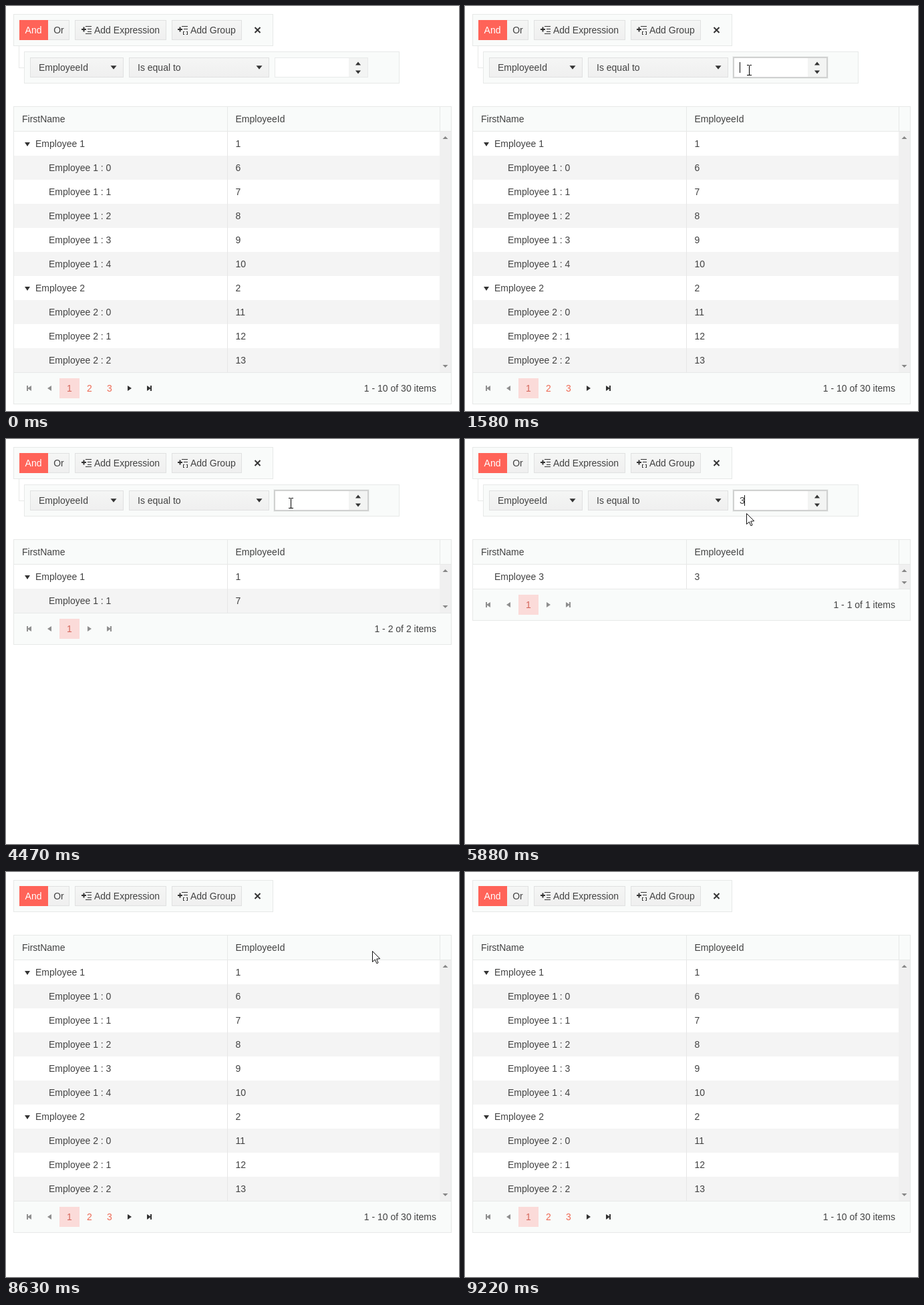
An HTML page with a canvas that plays this animation: 678x606 px, repeating every 9970 ms.

```html
<!DOCTYPE html>
<html lang="en">
<head>
<meta charset="utf-8">
<title>Filter and tree list</title>
<style>
  html, body { margin: 0; width: 100%; height: 100%; overflow: hidden; background: #fff; }
  canvas { display: block; }
</style>
</head>
<body>
<canvas id="stage" width="678" height="606"></canvas>
<script>
const ctx = document.getElementById('stage').getContext('2d');
const LOOP = 9970;
const FONT = '14px "Liberation Sans", Arial, sans-serif';
const INK = '#424242', DARK = '#333', RED = '#ff6358', LINE = '#e7e9e8', PANEL = '#f9fbfa';
const ROW = 36;

const allRows = [];
let nextId = 6;
[[1, 5], [2, 3]].forEach(([n, kids]) => {
  allRows.push({ name: 'Employee ' + n, id: n, open: true });
  for (let i = 0; i < kids; i++) allRows.push({ name: `Employee ${n} : ${i}`, id: nextId++, child: true });
});
const sevenRows = [allRows[0], allRows[2]];
const threeRows = [{ name: 'Employee 3', id: 3 }];

// Pointer trips: time, x, y; the pointer advances once per step.
const trips = [
  { from: 630, to: 5130, step: 64, path: [[630, 426, 518], [758, 425, 345], [886, 424, 206], [950, 424, 181],
    [1078, 425, 128], [1206, 425, 99], [1270, 425, 96], [3600, 425, 96], [3620, 426, 96]] },
  { from: 5130, to: 7030, step: 70, path: [[5130, 425, 99], [5200, 424, 104], [5340, 421, 111]] },
  { from: 7030, to: 8420, step: 65, path: [[7030, 432, 118], [7160, 474, 136], [7225, 503, 140], [7290, 530, 137],
    [7420, 559, 122], [7550, 564, 100], [7680, 564, 91]] },
  { from: 8420, to: 9220, step: 70, path: [[8420, 563, 94], [8490, 560, 100], [8630, 548, 118], [8770, 532, 182],
    [8980, 522, 380], [9190, 516, 557]] }
];
const caretSpans = [[1580, 2130], [2550, 3100], [3610, 4160], [4670, 5190], [5700, 6430], [6960, 7490]];

function along(path, t) {
  if (t <= path[0][0]) return { x: path[0][1], y: path[0][2] };
  for (let i = 1; i < path.length; i++) {
    const [t0, x0, y0] = path[i - 1], [t1, x1, y1] = path[i];
    if (t < t1) {
      const k = (t - t0) / (t1 - t0);
      return { x: Math.round(x0 + (x1 - x0) * k), y: Math.round(y0 + (y1 - y0) * k) };
    }
  }
  const end = path[path.length - 1];
  return { x: end[1], y: end[2] };
}

function pointerAt(t, lag = 0) {
  const trip = trips.find(m => t >= m.from && t < m.to);
  if (!trip) return null;
  const n = Math.floor((t - trip.from) / trip.step) - lag;
  return along(trip.path, trip.from + n * trip.step);
}

function fill(x, y, w, h, color) {
  ctx.fillStyle = color;
  ctx.fillRect(x, y, w, h);
}

function box(x, y, w, h, bg, border) {
  fill(x, y, w, h, bg);
  ctx.strokeStyle = border;
  ctx.lineWidth = 1;
  ctx.strokeRect(x + .5, y + .5, w - 1, h - 1);
}

function text(s, x, y, color = INK, align = 'left') {
  ctx.font = FONT;
  ctx.textAlign = align;
  ctx.fillStyle = color;
  ctx.fillText(s, x, y);
}

function shape(points, color) {
  ctx.beginPath();
  points.forEach(([x, y]) => ctx.lineTo(x, y));
  ctx.closePath();
  ctx.fillStyle = color;
  ctx.fill();
}

// Vertical triangle; a negative height points up.
function tri(cx, cy, half, h, color) {
  shape([[cx - half, cy - h / 2], [cx + half, cy - h / 2], [cx, cy + h / 2]], color);
}

// Sideways triangle; dir is -1 for left, 1 for right.
function side(cx, cy, dir, color, bar) {
  shape([[cx - 3 * dir, cy - 4], [cx - 3 * dir, cy + 4], [cx + 3 * dir, cy]], color);
  if (bar) fill(dir < 0 ? cx - 4 : cx + 2, cy - 4, 2, 8, color);
}

function button(x, y, w) {
  const g = ctx.createLinearGradient(0, y, 0, y + 30);
  g.addColorStop(0, '#f5f6f5');
  g.addColorStop(1, '#efefef');
  box(x, y, w, 30, g, '#e0e1e1');
}

function cross(cx, cy) {
  ctx.strokeStyle = DARK;
  ctx.lineWidth = 2;
  ctx.beginPath();
  for (const d of [-4, 4]) {
    ctx.moveTo(cx - 4, cy - d);
    ctx.lineTo(cx + 4, cy + d);
  }
  ctx.stroke();
}

function addIcon(x, group) {
  fill(x, 34, 7, 2, DARK);
  fill(x + 2.5, 31.5, 2, 7, DARK);
  fill(x + 6, 30, 9, 1, DARK);
  fill(x + 9, 34, 6, 1, DARK);
  if (group) {
    for (const [bx, tick] of [[x + 8, 0], [x + 14, -1]]) {
      fill(bx, 38, 1, 5, DARK);
      fill(bx + tick, 38, 2, 1, DARK);
      fill(bx + tick, 42, 2, 1, DARK);
    }
  } else {
    fill(x + 9, 38, 6, 1, DARK);
    fill(x + 6, 41, 9, 1, DARK);
  }
}

function toolbar() {
  box(11, 12, 389, 48, PANEL, LINE);
  button(62, 21, 33);
  fill(20, 21, 43, 30, RED);
  text('And', 41, 41, '#fff', 'center');
  text('Or', 79, 41, INK, 'center');
  button(103, 21, 137);
  addIcon(113, false);
  text('Add Expression', 132, 41);
  button(248, 21, 105);
  addIcon(257, true);
  text('Add Group', 276, 41);
  cross(376.5, 36);
}

function expression(value, focused, hovered, caret) {
  fill(19, 60, 1, 33, LINE);
  fill(19, 92, 8, 1, LINE);
  box(27, 68, 562, 48, PANEL, LINE);
  button(36, 77, 140);
  text('EmployeeId', 49, 97);
  tri(161, 92, 4.5, 5.5, DARK);
  button(184, 77, 210);
  text('Is equal to', 197, 97);
  tri(379, 92, 4.5, 5.5, DARK);

  if (focused) {
    fill(400, 75, 144, 34, 'rgba(0,0,0,.035)');
    fill(401, 76, 142, 32, 'rgba(0,0,0,.14)');
  }
  box(402, 77, 140, 30, '#fff', focused ? '#d2d2d2' : hovered ? '#dcdddd' : '#e8eaea');
  fill(513, 78, 28, 28, '#f3f4f3');
  tri(527, 86, 4, -5, DARK);
  tri(527, 99, 4, 5, DARK);
  text(value, 411, 97);
  if (caret) fill(value ? 418 : 411, 84, 1, 16, '#111');
}

function pager(top, full) {
  const c = top + 24, off = '#8f8f8f', on = full ? DARK : off;
  side(35, c, -1, off, true);
  side(65, c, -1, off);
  fill(80, c - 15, 30, 30, '#fbdbd9');
  text('1', 95, c + 5, '#d4675c', 'center');
  if (full) {
    text('2', 125, c + 5, '#ee6a55', 'center');
    text('3', 155, c + 5, '#ee6a55', 'center');
  }
  const x = full ? 185 : 125;
  side(x, c, 1, on);
  side(x + 29, c, 1, on, true);
  text(full ? '1 - 10 of 30 items' : top < 250 ? '1 - 1 of 1 items' : '1 - 2 of 2 items', 644, c + 5, INK, 'right');
}

function grid(top, rows, hover) {
  const first = top + 38, end = first + rows.length * ROW;
  box(11, top, 656, end + 48 - top, PANEL, LINE);
  text('FirstName', 24, top + 24);
  text('EmployeeId', 343.5, top + 24);
  for (const x of [331, 649]) fill(x, top + 1, 1, 36, LINE);
  fill(12, top + 37, 654, 1, LINE);

  rows.forEach((row, i) => {
    const y = first + i * ROW;
    const hot = hover && hover.x > 11 && hover.x < 649 && hover.y >= y && hover.y < y + ROW;
    fill(12, y, 637, ROW, hot ? '#ebebeb' : i % 2 ? '#f4f4f4' : '#fff');
    if (row.open) tri(32, y + 19, 4, 6, DARK);
    text(row.name, row.child ? 64 : 44, y + 23);
    text(row.id, 343.5, y + 23);
  });
  fill(331, first, 1, end - first, '#e6e6e6');
  fill(649, first, 17, end - first, '#f0f0f0');
  tri(657.5, first + 9, 4, -4, '#868686');
  tri(657.5, end - 9, 4, 4, '#868686');
  fill(12, end, 654, 1, LINE);
  pager(end, rows === allRows);
}

function pointer({ x, y }, beam) {
  if (beam) {
    fill(x, 0 + y - 7, 1, 15, '#000');
    for (const dy of [-8, 7]) {
      fill(x - 3, y + dy, 3, 1, '#000');
      fill(x + 1, y + dy, 3, 1, '#000');
    }
    return;
  }
  const outline = [[0, 0], [0, 16], [3.8, 12.5], [6.4, 18.3], [8.6, 17.3], [6.2, 11.7], [11.2, 11.2]];
  shape(outline.map(([dx, dy]) => [x + .5 + dx, y + .5 + dy]), '#fff');
  ctx.strokeStyle = '#111';
  ctx.lineWidth = 1;
  ctx.stroke();
}

function draw(t) {
  const value = t < 2550 ? '' : t < 4470 ? '7' : t < 5880 ? '' : '3';
  const rows = t >= 2550 && t < 4520 ? sevenRows : t >= 5880 && t < 7970 ? threeRows : allRows;
  const editing = t < 7900;
  const focused = t >= 1580 && t < 7830;
  const caret = caretSpans.some(([a, b]) => t >= a && t < b);
  const tip = pointerAt(t);
  const beam = editing && tip && tip.x > 402 && tip.x < 513 && tip.y > 77 && tip.y < 107;

  fill(0, 0, 678, 606, '#fff');
  toolbar();
  if (editing) expression(value, focused, beam, caret);
  grid(editing ? 150 : 94, rows, pointerAt(t, 1));
  if (tip) pointer(tip, beam);
}

const start = performance.now();
function tick() {
  draw((performance.now() - start) % LOOP);
  requestAnimationFrame(tick);
}
tick();
</script>
</body>
</html>
```
